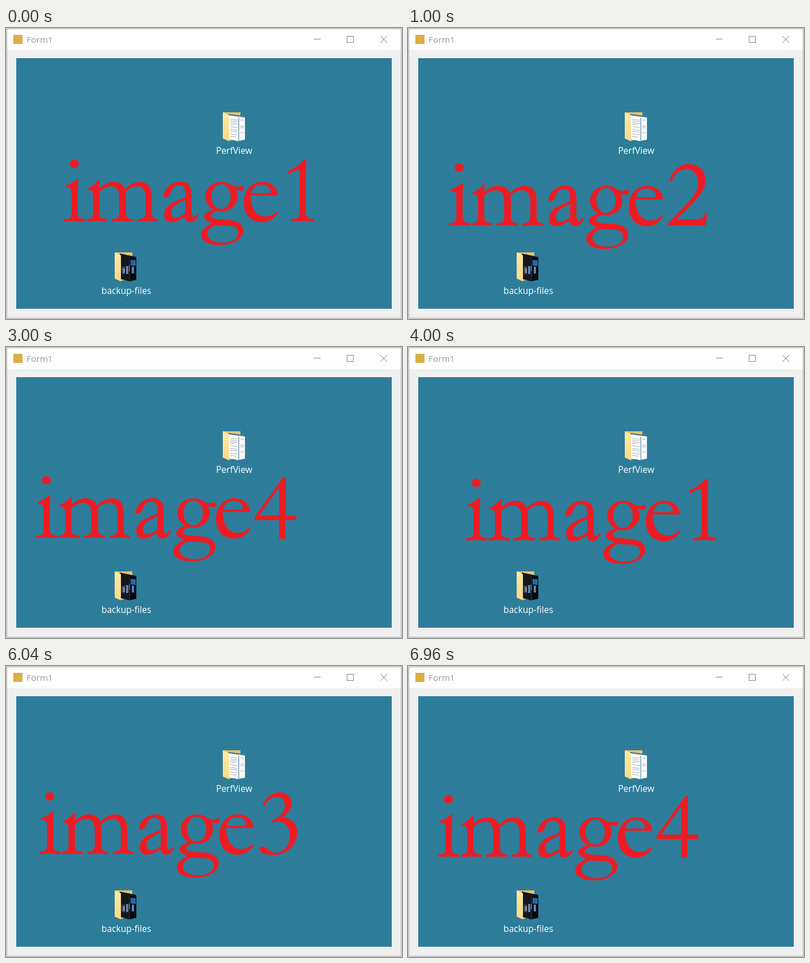
Animation of 696 by 511 pixels, one loop 8000 ms. Source, as an HTML page:

```html
<!DOCTYPE html>
<html lang="en">
<head>
<meta charset="utf-8">
<title>Form1</title>
<style>
  html, body { margin: 0; width: 100%; height: 100%; overflow: hidden; background: #e6e6e6; }
  svg { display: block; width: 696px; height: 511px; }
  text { font-family: "Open Sans", "Noto Sans", sans-serif; font-size: 15.6px; }
  .label { fill: #fff; text-anchor: middle; }
  .lettering { fill: #ed1c24; fill-rule: evenodd; }
</style>
</head>
<body>
<svg viewBox="0 0 696 511" xmlns="http://www.w3.org/2000/svg">
  <defs>
    <linearGradient id="flap" x2="0" y2="1">
      <stop stop-color="#ffe9a6"/><stop offset="1" stop-color="#fbd983"/>
    </linearGradient>
    <g id="folderBack"><path d="M0 0H31V46L11 50 0 46Z" fill="#eac265"/></g>
    <g id="folderFlap"><path d="M0 0 11 5V51L0 46Z" fill="url(#flap)"/></g>
  </defs>

  <!-- window -->
  <rect x="1.5" y="1.5" width="693" height="508" fill="#f0f0f0" stroke="#a3a3a3"/>
  <rect x="2" y="2" width="692" height="37" fill="#fff"/>
  <rect x="13" y="12" width="16" height="16" fill="#dcae45"/>
  <text x="36" y="26" fill="#999" style="font-size:15.3px">Form1</text>
  <g fill="none" stroke="#858585">
    <path d="M541 19.5H553"/>
    <rect x="599.5" y="14.5" width="11" height="11"/>
    <path d="M658 14 670 26M670 14 658 26"/>
  </g>
  <rect x="18" y="53" width="660" height="440" fill="#2d7d9a"/>

  <!-- folder with documents -->
  <g transform="translate(381 148)">
    <use href="#folderBack"/>
    <path d="M11 4 39 7V48L26 50 11 47Z" fill="#e9eef1"/>
    <path d="M10 3 39 7V9L10 5Z" fill="#2a6f9c"/>
    <path d="M29 9 39 10V48L29 50Z" fill="#f7f9fa"/>
    <path d="M11 6 28 10V51L11 47Z" fill="#fff"/>
    <path d="M28 10V51" stroke="#5d8da3" stroke-width="1.2"/>
    <path d="M13 12 26 14M13 15 26 17M13 18 26 20M13 21 22 22M13 25 26 27M13 30 26 32M13 33 26 35M13 38 26 40M13 42 24 44M31 14 37 14M31 24H37M31 27H37M31 36H37" stroke="#a9afb4" stroke-width="1.2"/>
    <use href="#folderFlap"/>
  </g>
  <text class="label" x="401" y="221">PerfView</text>

  <!-- folder with dark pictures -->
  <g transform="translate(191 394)">
    <use href="#folderBack"/>
    <path d="M9 2 38 8V48L26 51 11 47Z" fill="#15171c"/>
    <path d="M27 9 38 10V48L27 50Z" fill="#090a0d"/>
    <path d="M28 13 37 14V24L28 23Z" fill="#2268a8"/>
    <path d="M12 26 18 24V39L12 37Z" fill="#33466f"/>
    <path d="M20 24H24V38H20ZM30 25H34V37H30Z" fill="#5584bd"/>
    <path d="M15 28H18V36H15ZM25 23H27V33H25Z" fill="#a98578"/>
    <path d="M26 10V51" stroke="#343941"/>
    <use href="#folderFlap"/>
  </g>
  <text class="label" x="211.5" y="467">backup-files</text>

  <g id="scenes" class="lettering"></g>
</svg>
<script>
const LOOP = 8000;

// Outlines of the letters, placed as in the first scene.
const word = [
  // i
  "M112 238.5A8 7.3 0 0 1 128 238.5A8 7.3 0 0 1 112 238.5Z",
  "M104 277Q116 273 124 265.5H127Q126 280 126 295V325Q126 332 131 334L139 336V340Q120 338 102 340V336L109 335Q115 333 115 326V290Q115 281 110 280L104 279Z",
  // m
  "M143 282.5Q155 277 162 267.5H165Q164 275 164 281Q176 271 188 270Q204 270 209 283Q220 271 234 270Q256 270 256 296V325Q256 333 261 334.5L267 336V340Q249 338 231 340V336L238 335Q245 333 245 325V298Q245 278 230 278Q219 278 210 288Q211 292 211 298V325Q211 333 216 334.5L223 336V340Q205 338 186 340V336L192 335Q199 333 199 325V298Q199 278 184 278Q172 279 164 288V325Q164 333 170 334.5L178 336V340Q160 338 142 340V336L147 335Q153 333 153 325V297Q153 285 148 285L143 284.5Z",
  // a
  "M277 294C279 277 296 270 306 270C320 270 326 277 326 292V321C326 335 333 334 337 326L339 328C335 337 329 341 324 341C318 341 315 337 315 331C304 338 297 341 290 341C282 341 278 336 278 328C278 316 287 309 296 305L315 297V290C315 280 311 276 304 276C296 276 291 282 289 291C286 296 281 298 277 297Z M315 302C300 309 290 314 290 324C290 331 294 333 298 333C304 333 310 329 315 325Z",
  // g: bowl, ear, loop
  "M350 296A28.5 26 0 0 1 407 296A28.5 26 0 0 1 350 296Z M361 296A17 22 0 0 0 395 296A17 22 0 0 0 361 296Z",
  "M395 276C403 279 408 280 414 277C419 277 420 281 418 284C416 287 411 285 403 284Z",
  "M366 318C356 321 348 326 348 331C348 337 357 341 363 343C350 348 343 356 343 363C343 375 358 381 376 381C400 381 417 370 417 356C417 344 405 338 392 337C372 336 362 335 360 331C360 327 365 323 371 321Z M369 346C359 350 354 355 354 361C354 371 366 377 381 377C397 377 408 370 408 360C408 350 400 347 390 347Z",
  // e
  "M478 294H430C430 317 441 331 456 331C465 331 472 327 476 322L478 325C471 336 461 341 449 341C431 341 418 327 418 307C418 285 432 270 450 270C467 270 478 281 478 294Z M431 290H461C465 290 466 288 465 285C463 278 457 275 449 275C439 275 433 281 431 290Z"
];

// Each scene: shift of the word, its digit, and the times it appears.
const scenes = [
  { shift: [0, 0], shown: [[0, 1000], [4000, 5040]],
    digit: "M494 252Q510 246 523 232L528 231Q527 250 527 262V324Q527 333 533 334.5L542 336V340Q521 338 501 340V336L509 335Q516 333 516 324V256Q516 247 510 250L495 257Z" },
  { shift: [-30, 7], shown: [[1000, 2000], [5040, 6040]],
    digit: "M460 268C465 250 477 239 493 239C511 239 523 250 523 267C523 284 511 297 498 310L472 336H506C515 336 520 333 523 324L526 325L523 347Q490 345 456 347V344L486 313C502 296 510 286 510 272C510 257 501 248 489 248C477 248 469 256 464 269Z" },
  { shift: [-43, -9.5], shown: [[2000, 3000], [6040, 6960]],
    digit: "M451 244C457 230 468 222 480 222C493 222 502 230 502 241C502 251 496 259 486 265C502 267 512 277 512 291C512 315 494 332 470 332C456 332 446 328 446 322C446 318 449 316 453 317C460 320 465 328 473 328C489 328 499 314 499 297C499 282 489 273 477 273C474 273 471 274 468 275L467 272C481 266 490 256 490 246C490 236 484 230 475 230C467 230 460 235 454 246Z" },
  { shift: [-49, -4.5], shown: [[3000, 4000], [6960, LOOP]],
    digit: "M437 298L487 229L492 228V296H510V304H491V337H480V304H437Z M445 296H480V247Z" }
];

const add = (parent, tag, attrs = {}) => {
  const node = document.createElementNS("http://www.w3.org/2000/svg", tag);
  for (const [name, value] of Object.entries(attrs)) node.setAttribute(name, value);
  return parent.appendChild(node);
};

const hardCuts = shown => {
  const key = (time, opacity) => ({ offset: time / LOOP, opacity, easing: "step-end" });
  const keys = shown.flatMap(([from, to]) => [key(from, 1), key(to, 0)]);
  if (shown[0][0] > 0) keys.unshift(key(0, 0));
  if (shown.at(-1)[1] < LOOP) keys.push(key(LOOP, 0));
  return keys;
};

const stage = document.getElementById("scenes");
scenes.forEach(({ shift, shown, digit }, i) => {
  const scene = add(stage, "g", { role: "img", "aria-label": `image${i + 1}` });
  const letters = add(scene, "g", { transform: `translate(${shift})` });
  word.forEach(d => add(letters, "path", { d }));
  add(scene, "path", { d: digit });
  scene.animate(hardCuts(shown), { duration: LOOP, iterations: Infinity });
});
</script>
</body>
</html>
```
